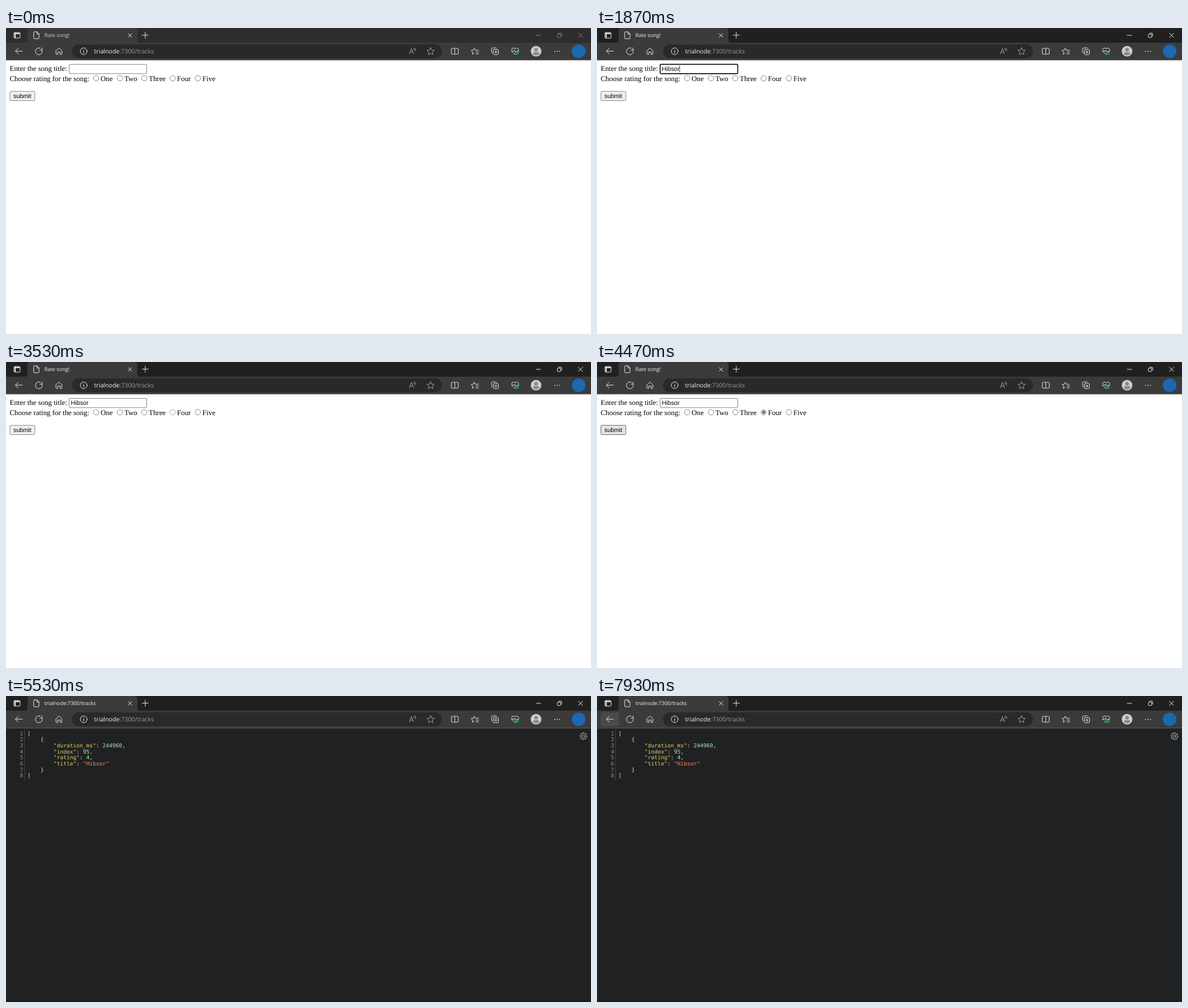
An HTML page that plays this animation: 1033x542 px, repeating every 8 s.

```html
<!DOCTYPE html>
<html lang="en">
<head>
<meta charset="utf-8">
<title>Rate song!</title>
<style>
html, body { margin: 0; width: 100%; height: 100%; overflow: hidden; background: #fff; }
svg { display: block; width: 1033px; height: 542px; }
text { text-rendering: geometricPrecision; }
.ui { font-family: "Open Sans", "Noto Sans", sans-serif; }
.serif { font: 12.91px "Liberation Serif", serif; }
.field { font: 10.76px "Liberation Sans", sans-serif; }
.mono { font: 9.58px "DejaVu Sans Mono", monospace; }
.icon { fill: none; stroke: #ececec; stroke-width: 1; stroke-linecap: round; stroke-linejoin: round; }
.dim { stroke: #a2a2a2; }
</style>
</head>
<body>
<svg viewBox="0 0 1033 542">
  <g id="form">
    <rect width="1033" height="542" fill="#fff"/>
    <g class="serif">
      <text x="6.5" y="76.3">Enter the song title:</text>
      <text x="6.5" y="94.1">Choose rating for the song:</text>
    </g>
    <rect id="input" x="111.5" y="64.4" width="137" height="16.4" rx="1.6" fill="#fff"/>
    <text id="typed" class="field" x="114.5" y="76.2"></text>
    <rect id="caret" y="66.6" width=".8" height="12.2"/>
    <g id="radios" class="serif"></g>
    <rect id="button" x="6.9" y="112.2" width="44" height="16.4" rx="2.2" stroke-width=".9"/>
    <text class="field" x="28.9" y="124.3" text-anchor="middle">submit</text>
  </g>

  <g id="json">
    <rect width="1033" height="542" fill="#202123"/>
    <rect y="538" width="1033" height="4" fill="#1c1d1e"/>
    <path d="M32.8 58V149" stroke="#4b4b4b" stroke-width=".9"/>
    <g id="code" class="mono"></g>
    <g class="icon" transform="translate(1019.7 71.2)" style="stroke:#c4c4c4">
      <path id="gear"/><circle r="2.2"/>
    </g>
  </g>

  <rect id="titlebar" width="1033" height="27"/>
  <rect y="26" width="1033" height="31" fill="#3b3b3b"/>
  <path d="M0 56.8H1033" stroke="#5c5c5c"/>
  <path d="M33 26.5Q38 26.5 38 21V5Q38 0 43 0H227Q232 0 232 5V21Q232 26.5 237 26.5Z" fill="#3b3b3b"/>

  <g class="icon">
    <rect x="13.9" y="8" width="11" height="10" rx="2"/>
    <path d="M14.2 9.8H24.6M16.2 11V17.5" stroke-width="2" stroke-linecap="butt"/>
    <path id="doc" d="M50.5 6.8H54.8L58.3 10.4V17.7Q58.3 19 57 19H50.2Q48.9 19 48.9 17.7V8.2Q48.9 6.8 50.5 6.8ZM54.6 7V10.6H58.2"/>
    <path d="M215.8 10L222.2 16.4M222.2 10L215.8 16.4M240.5 12.7H251.3M245.9 7.3V18.1"/>
  </g>
  <g id="spinner" fill="#42a5e8"><circle r="1.3"/><circle r="1.3"/></g>
  <text id="tabtitle" class="ui" x="67.7" y="16.3" font-size="9.2"></text>
  <g id="winctl" class="icon" style="stroke-linecap:butt">
    <path d="M936 13H944.5M1010.5 9L1018.5 17M1018.5 9L1010.5 17"/>
    <rect x="973.6" y="11" width="5.8" height="5.8" rx="1"/>
    <path d="M975.4 9.2H980Q981.2 9.2 981.2 10.4V15"/>
  </g>

  <rect id="backhover" x="6.5" y="29" width="32.5" height="24.5" rx="3"/>
  <rect x="116.5" y="29" width="653.5" height="24.5" rx="12.2" fill="#292929"/>
  <g class="icon">
    <path d="M28.8 41H16.8M21.8 35.8L16.5 41L21.8 46.2"/>
    <path id="reload" d="M63.8 39A6.1 6.1 0 1 1 60.4 35.6M63.7 35.2V39.1H59.8"/>
    <path id="stop" d="M53.6 36.8L62.4 45.6M62.4 36.8L53.6 45.6"/>
    <path d="M88.3 40.3L93.5 35.5L98.7 40.3V45.7Q98.7 46.8 97.6 46.8H95.6V42.6H91.4V46.8H89.4Q88.3 46.8 88.3 45.7Z"/>
    <circle cx="137.2" cy="41.2" r="6"/>
    <path d="M137.2 40.6V44M137.2 38.3V38.5" stroke-width="1.2"/>
    <path class="dim" d="M712.2 46L716 36.4L719.8 46M713.5 42.7H718.5M720.2 36.2Q721.6 37.7 721.2 39.6M722 35Q724.4 37.5 723.4 40.4"/>
    <path class="star dim" transform="translate(749.8 41.6)"/>
    <path d="M790.8 36.2H787.6Q786.4 36.2 786.4 37.4V45Q786.4 46.2 787.6 46.2H790.8M794.2 36.2H797.4Q798.6 36.2 798.6 37.4V45Q798.6 46.2 797.4 46.2H794.2M792.5 35V47.4"/>
    <path d="M826 44.8L823.4 46.8L824.2 42.8L821.4 39.9L825 39.3L826.8 35.8L828.6 39.3H834.4M829.8 42.6H834.4M829.8 45.9H834.4"/>
    <rect x="860.6" y="38.2" width="9" height="9" rx="1.8"/>
    <path d="M865.1 40.5V44.9M862.9 42.7H867.3M859 44.6Q857.8 44.2 857.7 42.8L857.3 37.4Q857.3 35.8 858.9 35.5L864.6 35Q866 35 866.5 36.2"/>
    <path d="M893.3 40.2C891.8 35.3 896.8 34 899.1 37.1C901.4 34 906.4 35.3 904.9 40.2M894.8 43.2L899.1 47.2L902.2 44.4M892.8 41.5H896L897.7 39L899.9 43.2L901.4 41.4H905.4"/>
    <circle cx="902.6" cy="44.6" r="2.9" fill="#159a35" stroke="none"/>
  </g>
  <circle cx="936" cy="41.2" r="9.4" fill="#cfccca"/>
  <g fill="#8b8886">
    <circle cx="936" cy="38.4" r="3.2"/>
    <path d="M930.4 46.3Q930.4 42.8 933 42.8H939Q941.6 42.8 941.6 46.3Q936 50.6 930.4 46.3Z"/>
  </g>
  <g fill="#ececec"><circle cx="969" cy="41.3" r=".9"/><circle cx="973.3" cy="41.3" r=".9"/><circle cx="977.6" cy="41.3" r=".9"/></g>
  <circle cx="1011.2" cy="41.2" r="12" fill="#1b68b3"/>
  <text class="ui" x="155.6" y="45" font-size="10.65" fill="#f2f2f2">trialnode<tspan fill="#9b9b9b">:7300/tracks</tspan></text>

  <g id="tooltip">
    <rect x="16.5" y="45.5" width="235" height="20" rx="2" fill="#2b2b2b" stroke="#555"/>
    <text class="ui" x="134" y="58.8" font-size="8.9" fill="#f2f2f2" text-anchor="middle">Click to go back (Alt+Left arrow), hold to see history</text>
  </g>
</svg>
<script>
const LOOP = 8000;
const SONG = "Hibsor", ADDRESS = "trialnode:7300/tracks";
const KEY_TIMES = [730, 1000, 1270, 1400, 1670, 1870];
const $ = id => document.getElementById(id);

function add(parent, tag, attrs, text = "") {
  const el = document.createElementNS("http://www.w3.org/2000/svg", tag);
  set(el, attrs);
  el.textContent = text;
  parent.append(el);
  return el;
}
function set(el, attrs) {
  for (const k in attrs) el.setAttribute(k, attrs[k]);
}
function show(id, on) {
  $(id).style.display = on ? "" : "none";
}
// closed outline whose radius depends on the step index
function ring(steps, radius) {
  let d = "";
  for (let i = 0; i < steps; i++) {
    const a = i / steps * 2 * Math.PI - Math.PI / 2, r = radius(i);
    d += (i ? "L" : "M") + (r * Math.cos(a)).toFixed(2) + " " + (r * Math.sin(a)).toFixed(2);
  }
  return d + "Z";
}

set(document.querySelector(".star"), { d: ring(10, i => i % 2 ? 3.3 : 6.8) });
set($("gear"), { d: ring(32, i => i % 4 < 2 ? 6.3 : 4.8) });

const radios = [["One", 159.2, 167], ["Two", 201.2, 209], ["Three", 244.2, 252], ["Four", 294.3, 302], ["Five", 338.8, 346.8]]
  .map(([label, cx, x]) => {
    add($("radios"), "text", { x, y: 94.1 }, label);
    return add($("radios"), "circle", { cx, cy: 89, r: 4.8, fill: "#fff", stroke: "#767676", "stroke-width": .9 });
  });
const four = radios[3];
const dot = add($("radios"), "circle", { cx: 294.3, cy: 89, r: 2.9 });

// each line: pairs of column, text, colour
const KEY = "#e6cf62", NUM = "#9df3b4", STR = "#ff8660", PUNCT = "#d6d6d6", BRACE = "#e6dcae";
const pair = (key, value, color, tail = ",") => [
  [8, `"${key}"`, KEY], [10 + key.length, ":", PUNCT],
  [12 + key.length, value, color], [12 + key.length + value.length, tail, PUNCT]
];
[
  [[0, "[", PUNCT]],
  [[4, "{", BRACE]],
  pair("duration_ms", "244960", NUM),
  pair("index", "95", NUM),
  pair("rating", "4", NUM),
  pair("title", `"${SONG}"`, STR, ""),
  [[4, "}", BRACE]],
  [[0, "]", PUNCT]]
].forEach((line, i) => {
  const y = 69.7 + i * 10.68;
  add($("code"), "text", { x: 30.3, y, fill: "#8c8c8c", "text-anchor": "end" }, i + 1);
  for (const [col, text, fill] of line)
    add($("code"), "text", { x: 37.8 + col * 5.77, y, fill }, text);
});

function draw(t) {
  const active = t >= 200, focused = t >= 270 && t < 3400;
  const loading = t >= 5270 && t < 5530, done = t >= 5530;

  set($("titlebar"), { fill: active ? "#202020" : "#2d2d2d" });
  $("winctl").style.stroke = active ? "#ececec" : "#808080";
  set($("tabtitle"), { fill: active ? "#f2f2f2" : "#cfcfcf" });
  $("tabtitle").textContent = loading || done ? ADDRESS : "Rate song!";
  show("doc", !loading);
  show("spinner", loading);
  show("reload", !loading);
  show("stop", loading);
  show("form", !done);
  show("json", done);

  set($("input"), { stroke: focused ? "#101010" : "#767676", "stroke-width": focused ? 1.7 : .9 });
  $("typed").textContent = SONG.slice(0, KEY_TIMES.filter(k => t >= k).length);
  show("caret", focused && !(t >= 2400 && t < 2930));
  if (!done) set($("caret"), { x: 114.5 + $("typed").getComputedTextLength() });

  const pressed = t >= 3400 && t < 3730;
  const tone = pressed ? "#9a9a9a" : t >= 3130 && t < 4000 ? "#4f4f4f" : "#767676";
  four.setAttribute("stroke", tone);
  set(dot, { fill: t < 3730 ? "none" : t < 4000 ? "#4f4f4f" : "#686868" });

  const [fill, stroke] = t < 4470 ? ["#efefef", "#767676"]
    : t >= 5000 && t < 5200 ? ["#f5f5f5", "#8d8d8d"] : ["#e5e5e5", "#4f4f4f"];
  set($("button"), { fill, stroke });

  const turn = Math.floor((t - 5470) / 66) * .6;
  [...$("spinner").children].forEach((c, i) => {
    const a = 3.5 - i * 1.2 - turn;
    set(c, { cx: 52.8 + 5 * Math.cos(a), cy: 12.9 + 4.4 * Math.sin(a) });
  });

  set($("backhover"), { fill: t < 7000 ? "none" : t < 7600 ? "#3e3e3e" : "#4a4a4a" });
  show("tooltip", t >= 7600 && t < 7930);
}

const start = performance.now();
function tick() {
  draw((performance.now() - start) % LOOP);
  requestAnimationFrame(tick);
}
tick();
</script>
</body>
</html>
```
